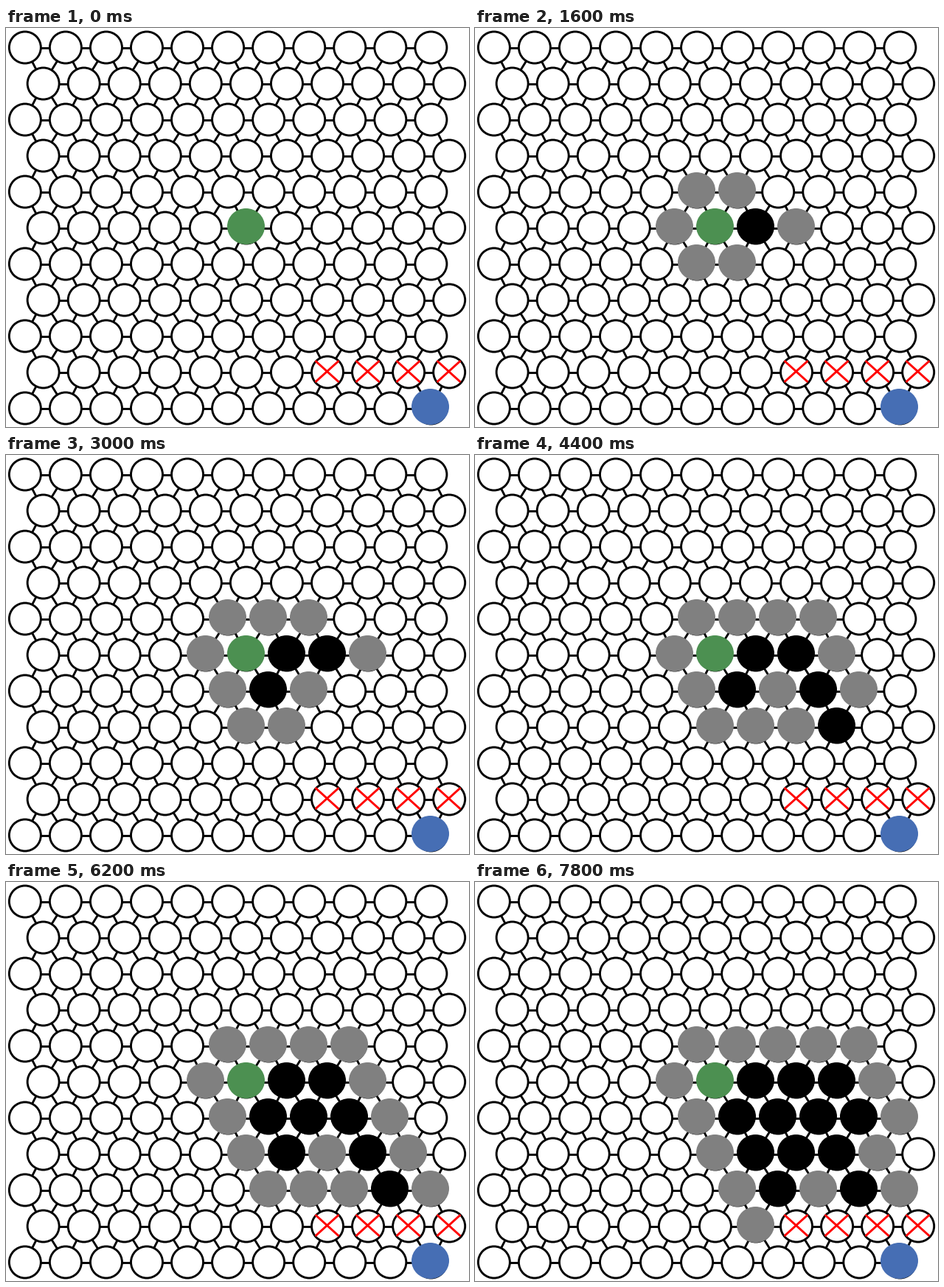
A matplotlib script for the animation above (8 s loop, 628 by 542 pixels).

```python
import matplotlib.pyplot as plt
from matplotlib.animation import FuncAnimation
from matplotlib.collections import LineCollection
from matplotlib.patches import Circle, Ellipse

W, H, DPI = 628, 542, 100
ROWS = COLS = 11
STEP_MS, STEPS = 200, 40
LINE = 2.9 * 72 / DPI  # stroke width in points

START, GOAL = (5, 5), (10, 10)
WALLS = [(9, c) for c in range(7, 11)]
# Cells in the order the search expands them
VISITS = [(5, 6), (6, 6), (5, 7), (6, 8), (7, 8), (8, 9), (6, 7),
          (7, 6), (8, 7), (5, 8), (6, 9), (7, 7)]

GREEN, BLUE, GRAY = "#4c9051", "#466eb4", "#808080"


def neighbours(cell):
    """Adjacent cells, clockwise from the east."""
    r, c = cell
    east = c + r % 2
    west = east - 1
    around = [(r, c + 1), (r + 1, east), (r + 1, west),
              (r, c - 1), (r - 1, west), (r - 1, east)]
    return [(y, x) for y, x in around if 0 <= y < ROWS and 0 <= x < COLS]


def centre(cell):
    r, c = cell
    return 25.8 + 24.8 * (r % 2) + 55.06 * c, 26.5 + 49 * r


def mark_corner(cell):
    """Top left corner of the 51 x 49 box that discs and crosses sit in."""
    r, c = cell
    return 55 * c + 25 * (r % 2), 49 * r


def search_events():
    """One (cell, colour) change per step: open cells gray, visited black."""
    seen = {START, *WALLS}
    events = []
    for cell in [START] + VISITS:
        if cell != START:
            events.append((cell, "black"))
        for near in neighbours(cell):
            if near not in seen:
                seen.add(near)
                events.append((near, GRAY))
    return events


fig = plt.figure(figsize=(W / DPI, H / DPI), dpi=DPI, facecolor="white")
ax = fig.add_axes([0, 0, 1, 1])
ax.set_xlim(0, W)
ax.set_ylim(H, 0)
ax.axis("off")


def disc(cell, color):
    x, y = mark_corner(cell)
    return ax.add_patch(Ellipse((x + 25.5, y + 24.5), 51, 49, fc=color,
                                lw=0, zorder=4))


def cross(cell):
    x, y = mark_corner(cell)
    left, right, top, bottom = x + 9.5, x + 41.5, y + 11, y + 40
    for ends in ([top, bottom], [bottom, top]):
        ax.plot([left, right], ends, color="red", lw=LINE,
                solid_capstyle="butt", zorder=3)


cells = [(r, c) for r in range(ROWS) for c in range(COLS)]
edges = [(centre(a), centre(b)) for a in cells for b in neighbours(a) if a < b]
ax.add_collection(LineCollection(edges, colors="black", linewidths=LINE,
                                 zorder=1))
for cell in cells:
    ax.add_patch(Circle(centre(cell), 21.5, fc="white", ec="black", lw=LINE,
                        zorder=2))
for cell in WALLS:
    cross(cell)
disc(START, GREEN)
disc(GOAL, BLUE)

events = search_events()
discs = {cell: disc(cell, GRAY) for cell in dict(events)}


def update(step):
    colors = dict(events[:step])  # the latest colour of a cell wins
    for cell, patch in discs.items():
        patch.set_visible(cell in colors)
        patch.set_facecolor(colors.get(cell, GRAY))
    return list(discs.values())


anim = FuncAnimation(fig, update, frames=STEPS, interval=STEP_MS,
                     init_func=lambda: update(0), repeat=True, blit=False)
plt.show()
```
